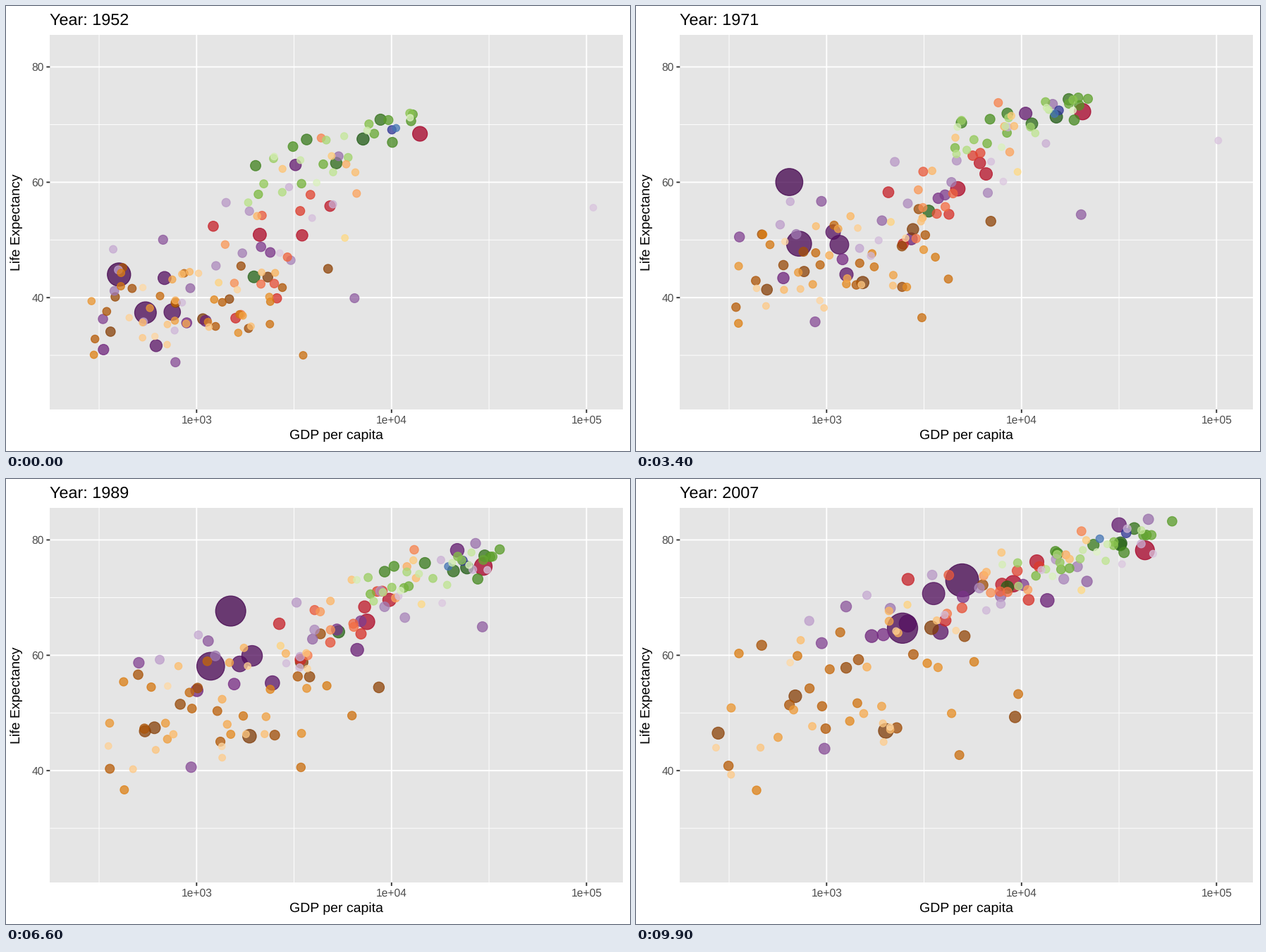
Write a matplotlib script that moves like this. It is 885 by 632 pixels and loops after 10 s.

```python
import numpy as np
import matplotlib.pyplot as plt
from matplotlib.animation import FuncAnimation
from matplotlib.colors import to_rgb
from matplotlib.patches import Rectangle

W, H, DPI = 885, 632, 100
PX = 72 / DPI                       # points per pixel
START, END = 1952, 2007
FRAMES = 100
KNOTS = np.linspace(START, END, 12)  # a survey every five years
RANKS = [0, 0.03, 0.1, 0.3, 0.7, 1]

rng = np.random.default_rng(11)
plt.rcParams["font.family"] = "Liberation Sans"
plt.rcParams["text.hinting"] = "none"

# Per continent, most populous country first:
#   cloud: log income mean and spread, life mean and spread, their correlation,
#          each at the start, the middle and the end
#   people: millions at the end for RANKS; growth: start / end population
#   known: rank -> (income, life expectancy) at even steps in time
SERIES = [
    dict(count=52, growth=0.25, people=[135, 85, 40, 17, 6, 0.25],
         shades=["#7F3B08", "#B35806", "#E08214", "#FDB863", "#FED9A6"],
         cloud=[(2.95, 3.11, 3.14), (0.28, 0.33, 0.4), (39, 49.5, 55),
                (4.2, 5.5, 8.5), (0.25, 0.5, 0.55)],
         known={0: [(1077, 36.3), (1800, 45.5), (2014, 46.9)],
                2: [(362, 34.1), (570, 44.7), (691, 52.9)],
                3: [(781, 39.1), (760, 47), (278, 46.5)],
                4: [(4725, 45), (8300, 57), (9270, 49.3)],
                19: [(3521, 30), (2900, 39.5), (4797, 42.7)]}),
    dict(count=25, growth=0.45, people=[301, 230, 90, 30, 9, 1],
         shades=["#A50026", "#D73027", "#F46D43", "#FDAE61", "#FEDA86"],
         cloud=[(3.47, 3.77, 3.91), (0.22, 0.19, 0.25), (53, 66, 73.5),
                (9, 5.5, 3.6), (0.65, 0.8, 0.6)],
         known={0: [(13990, 68.4), (24500, 74), (42952, 78.2)],
                1: [(2109, 50.9), (6800, 62.5), (9066, 72.4)],
                2: [(3478, 50.8), (8800, 66.3), (11978, 76.2)]}),
    dict(count=33, growth=0.41, people=[1319, 1110, 180, 48, 20, 0.7],
         shades=["#40004B", "#762A83", "#9970AB", "#C2A5CF", "#DCC8E0"],
         cloud=[(3.13, 3.58, 3.85), (0.36, 0.42, 0.46), (47, 62, 72),
                (8.5, 7, 5), (0.5, 0.7, 0.75)],
         known={0: [(400, 44), (520, 50), (700, 64),
                    (1220, 66.4), (2250, 70.2), (4959, 73)],
                1: [(547, 37.4), (820, 54.8), (2452, 64.7)],
                2: [(750, 37.5), (1420, 54.5), (3541, 70.7)],
                3: [(685, 43.4), (1330, 55), (2606, 65.5)],
                5: [(3217, 63), (18000, 76), (31656, 82.6)],
                11: [(331, 36.3), (370, 57), (944, 62.1)],
                12: [(779, 28.8), (920, 39), (975, 43.8)],
                14: [(6460, 39.9), (34000, 61), (21655, 72.8)],
                31: [(108382, 55.6), (106000, 67), (31000, 74.8), (47307, 77.6)]}),
    dict(count=30, growth=0.8, people=[82, 72, 58, 20, 6, 0.3],
         shades=["#1F5A14", "#4D9221", "#7FBC41", "#B8E186", "#E0F3C6"],
         cloud=[(3.7, 4.13, 4.34), (0.26, 0.22, 0.24), (65.5, 72.8, 77.8),
                (4.6, 2.2, 2.8), (0.85, 0.75, 0.88)],
         known={0: [(7144, 67.5), (21200, 73.1), (32170, 79.4)],
                1: [(1969, 43.6), (4255, 60.2), (8458, 71.8)]}),
    dict(count=2, growth=0.45, people=[20, 18, 15, 10, 6, 4],
         shades=["#313695", "#4575B4"], cloud=None,
         known={0: [(10040, 69.1), (19000, 74), (34435, 81.2)],
                1: [(10557, 69.4), (17200, 73), (25185, 80.2)]}),
]


def over_time(values, at):
    return np.interp(at, np.linspace(START, END, len(values)), values)


def cloud_paths(cloud, count):
    """Log income and life expectancy at KNOTS for a cloud of countries."""
    mean, spread, life, life_spread, corr = (over_time(v, KNOTS) for v in cloud)

    def trait():
        return rng.permutation(np.linspace(-1.7, 1.7, count))[:, None]

    turn = (KNOTS - START) / (END - START) * 1.2
    wealth = trait() * np.cos(turn / 2) + trait() * np.sin(turn / 2)
    health = trait()
    jitter = rng.normal(size=(2, count, len(KNOTS)))
    income = mean + spread * wealth + 0.02 * jitter[0]
    mix = corr * wealth + np.sqrt(1 - corr ** 2) * health
    return income, life + life_spread * mix + 0.4 * jitter[1]


def ramp(colors, n):
    stops = np.array([to_rgb(c) for c in colors])
    at, pos = np.linspace(0, 1, n), np.linspace(0, 1, len(colors))
    return np.column_stack([np.interp(at, pos, stops[:, k]) for k in range(3)])


def px(log_income):
    return 270.3 + 276.5 * (log_income - 3)


def py(life):
    return 86.5 + 8.192 * (80 - life)


years = np.linspace(START, END, FRAMES)
xs, ys, pops, colors = [], [], [], []
for s in SERIES:
    n = s["count"]
    colors.extend(ramp(s["shades"], n))
    people = np.exp(np.interp(np.linspace(0, 1, n), RANKS, np.log(s["people"])))
    if s["cloud"]:
        incomes, lives = cloud_paths(s["cloud"], n)
    for i in range(n):
        if i in s["known"]:
            income, life = np.array(s["known"][i], float).T
            income = np.log10(income)
        else:
            income, life = incomes[i], lives[i]
        xs.append(px(over_time(income, years)))
        ys.append(py(over_time(life, years)))
        pops.append(over_time([people[i] * s["growth"], people[i]], years))

order = np.argsort([-p[-1] for p in pops])
xs, ys, pops, colors = (np.array(v)[order] for v in (xs, ys, pops, colors))
point_size = 2 + 10 * np.sqrt(pops / pops.max())
diameter = 0.75 * (point_size * 2.845 + 0.945) * 128 / 72
areas = (diameter * PX) ** 2

fig = plt.figure(figsize=(W / DPI, H / DPI), dpi=DPI, facecolor="white")
ax = fig.add_axes([0, 0, 1, 1])
ax.set_xlim(0, W)
ax.set_ylim(H, 0)
ax.axis("off")

LEFT, RIGHT, TOP, BOTTOM = 62.3, 875.3, 41, 573
MAJOR, MINOR, TICK = 1.9, 0.95, 4.9
ax.add_patch(Rectangle((LEFT, TOP), RIGHT - LEFT, BOTTOM - TOP, fc="#E5E5E5", lw=0))


def line(x, y, width, color="white"):
    ax.plot(x, y, color=color, lw=width * PX, solid_capstyle="butt",
            snap=False, zorder=1)


def label(x, y, text, size, color="black", **kw):
    return ax.text(x, y, text, fontsize=size * PX, color=color, **kw)


for v in (3, 4, 5):
    line([px(v - 0.5)] * 2, [TOP, BOTTOM], MINOR)
    line([px(v)] * 2, [TOP, BOTTOM], MAJOR)
    line([px(v)] * 2, [BOTTOM, BOTTOM + TICK], MAJOR, "#333333")
    label(px(v), 592.8, f"1e+0{v}", 15.65, "#4D4D4D", ha="center")
for v in (40, 60, 80):
    line([LEFT, RIGHT], [py(v - 10)] * 2, MINOR)
    line([LEFT, RIGHT], [py(v)] * 2, MAJOR)
    line([LEFT - TICK, LEFT], [py(v)] * 2, MAJOR, "#333333")
    label(53.6, py(v) + 5.6, str(v), 15.65, "#4D4D4D", ha="right")

label((LEFT + RIGHT) / 2, 614.8, "GDP per capita", 19.5, ha="center")
label(23.6, (TOP + BOTTOM) / 2, "Life Expectancy", 19.5, rotation=90,
      ha="right", va="center")
title = label(61.8, 26.3, "", 23.4)

dots = ax.scatter(xs[:, 0], ys[:, 0], s=areas[:, 0], c=colors, alpha=0.75,
                  linewidths=1.26 * PX, zorder=3)


def update(i):
    dots.set_offsets(np.column_stack([xs[:, i], ys[:, i]]))
    dots.set_sizes(areas[:, i])
    title.set_text(f"Year: {round(years[i])}")
    return dots, title


anim = FuncAnimation(fig, update, frames=FRAMES, interval=100,
                     repeat=True, repeat_delay=0)
plt.show()
```
